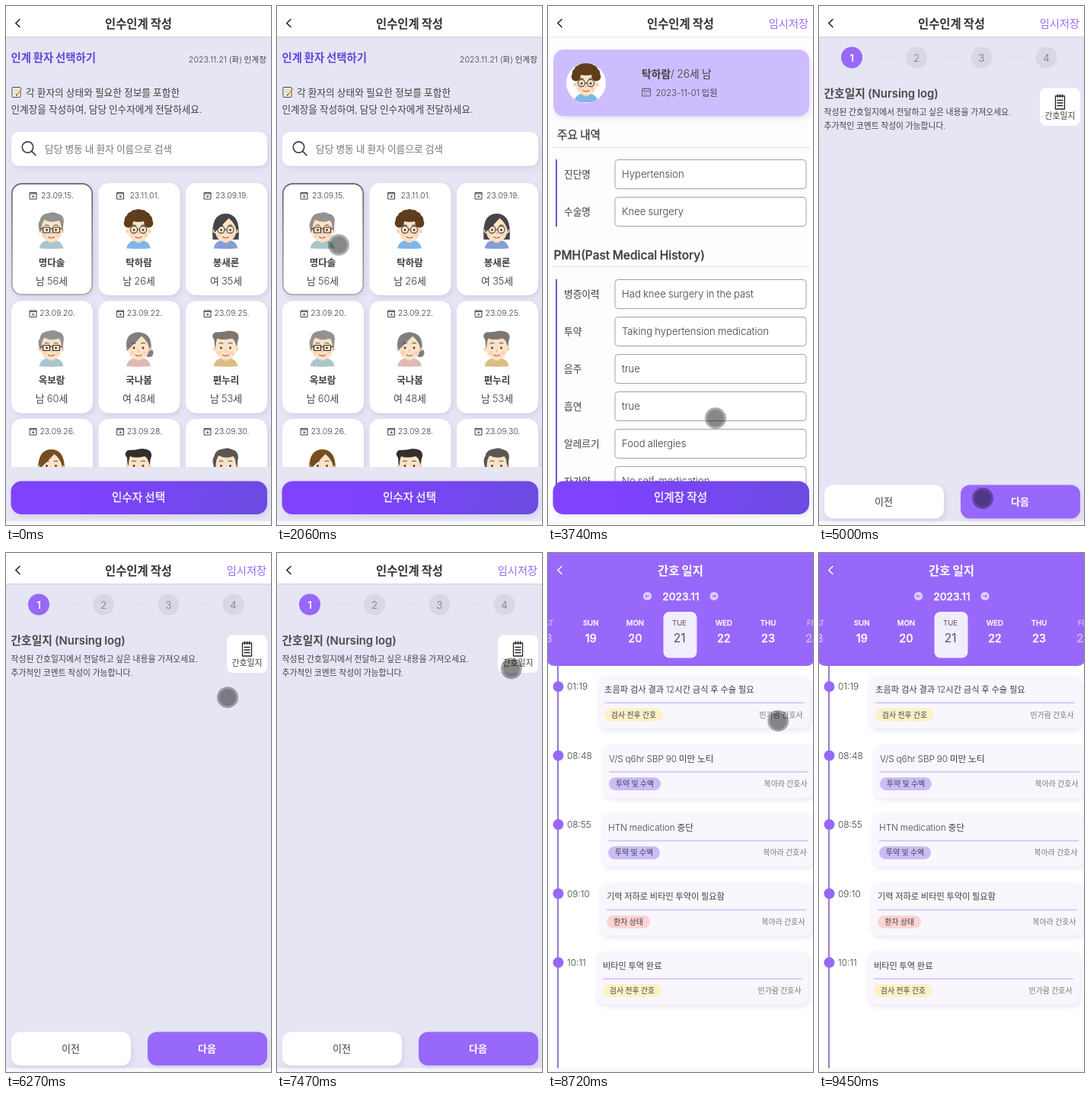
These frames come from a looping animation (348 px wide and 680 px high, 9790 ms). An HTML page:

```html
<!DOCTYPE html>
<html lang="ko">
<head>
<meta charset="utf-8">
<title>인수인계 작성</title>
<style>
html,body{margin:0;width:100%;height:100%;overflow:hidden;background:#fff}
svg{display:block;width:100vw;height:100vh}
text{font-family:Inter,"Noto Sans CJK KR","Noto Sans KR","Noto Sans CJK",sans-serif;word-spacing:-.04em}
.soft{filter:drop-shadow(2px 3px 3px rgba(80,60,160,.12))}
</style>
</head>
<body>
<svg id="stage" viewBox="0 0 348 680" preserveAspectRatio="none"></svg>
<script>
const LOOP = 9790, STEP = 200 / 3;
const PURPLE = '#9768fa', INK = '#404040', LILAC = '#e6e5f4';

// ---------- drawing helpers ----------
// Weight 500 gets a hairline outline, since the Korean face has no medium cut.
const text = (x, midY, str, size, {fill = INK, weight = 300, anchor = 'start', more = ''} = {}) =>
  `<text x="${x}" y="${midY + size * .37}" font-size="${size}" fill="${fill}" font-weight="${weight}" text-anchor="${anchor}"
    ${weight === 500 ? `stroke="${fill}" stroke-width=".3"` : ''} ${more}>${str}</text>`;
const rect = (x, y, w, h, r, fill, more = '') =>
  `<rect x="${x}" y="${y}" width="${w}" height="${h}" rx="${r}" fill="${fill}" ${more}/>`;
const circle = (x, y, r, fill, more = '') =>
  `<circle cx="${x}" cy="${y}" r="${r}" fill="${fill}" ${more}/>`;
const path = (d, fill, more = '') => `<path d="${d}" fill="${fill}" ${more}/>`;
const stroke = (d, color, width = 1, more = '') =>
  path(d, 'none', `stroke="${color}" stroke-width="${width}" stroke-linecap="round" stroke-linejoin="round" ${more}`);
const group = (body, attrs = '') => `<g ${attrs}>${body}</g>`;
const mid = (opts = {}) => ({anchor: 'middle', ...opts});

const backArrow = color => stroke('M18 17.5L12.8 22.5L18 27.5', color, 1.6);

function header(saveLink) {
  return rect(0, 0, 348, 40, 0, '#fff', 'style="filter:drop-shadow(0 1px 1px rgba(60,50,120,.12))"') +
    backArrow('#222') +
    text(174, 23, '인수인계 작성', 15.4, mid({weight: 700, fill: '#333'})) +
    (saveLink ? text(342, 23, '임시저장', 14.2, {fill: PURPLE, anchor: 'end'}) : '');
}

const mainButton = label =>
  rect(6.5, 622.5, 336.5, 43.5, 14, 'url(#cta)', 'class="soft"') +
  text(174, 644, label, 14.5, mid({fill: '#fff', weight: 500}));

// ---------- avatars ----------
const CAP = 'M-15 3Q-19-8-15-12Q-14-21-2-22Q3-24 8-21Q18-19 16-8L15 3L13-3Q13-9 10-12Q0-8-9-13Q-13-9-13 2Z';
const QUIFF = 'M-14 0Q-15-6-15-10Q-20-16-14-20Q-4-20 4-22Q18-22 17-12Q15-8 15 0L13-5Q12-10 8-12Q-4-9-11-12Q-13-8-13-1Z';
const FRINGE = 'M-15 4Q-17-19 0-20Q17-19 15 4Q13-8 4-15Q-5-5-15 4Z';

function curls(color) {
  let out = `<ellipse cy="-17" rx="14" ry="7" fill="${color}"/>`;
  for (let i = 0; i < 9; i++) {
    const a = Math.PI * (1 + i / 8);
    out += circle(13.3 * Math.cos(a), -8.5 + 12.5 * Math.sin(a), 6, color);
  }
  return out;
}

const hairstyles = {
  cap: c => ['', path(CAP, c)],
  quiff: c => ['', path(QUIFF, c)],
  curly: c => ['', curls(c)],
  bob: c => [path('M-17 13Q-20-21 0-21Q20-21 17 13Z', c), path(FRINGE, c)],
  bun: c => [circle(14, 7, 5.5, c) + path('M-15 4Q-20-19 0-20Q20-19 16 6Z', c), path(FRINGE, c)],
};

function avatar(x, y, {style, hair, shirt, glasses}) {
  const [back, front] = hairstyles[style](hair);
  const dark = '#4a3a35';
  const lens = side => circle(6 * side, 0, 4.6, 'none', 'stroke="#444" stroke-width="1.1"');
  const frames = {
    square: stroke('M-11-3h9v7h-9zM2-3h9v7h-9zM-2-1h4M-11-1h-3M11-1h3', '#333', 1.2),
    round: lens(-1) + lens(1) + stroke('M-1.5 0h3', '#444'),
  };
  return group(
    back + path('M-16 24.5Q-14 15-5 14H5Q14 15 16 24.5Q0 26-16 24.5Z', shirt) +
    path('M-5 10H5V15Q0 20-5 15Z', '#f6d0ac') +
    circle(-14, 2, 2.8, '#f6d3b1') + circle(14, 2, 2.8, '#f6d3b1') +
    path('M-13.5-5Q-13.5-17 0-17Q13.5-17 13.5-5V3Q12.5 15 0 16Q-12.5 15-13.5 3Z', '#fde2c6') +
    circle(-8.5, 7, 2.6, '#f9c9b4', 'opacity=".6"') + circle(8.5, 7, 2.6, '#f9c9b4', 'opacity=".6"') +
    front +
    stroke('M-8.5-5.5q2.5-1.5 5 0M3.5-5.5q2.5-1.5 5 0', dark, 1) +
    circle(-6, .5, 1.4, dark) + circle(6, .5, 1.4, dark) +
    (frames[glasses] || '') +
    stroke('M0 3v2.5', '#e3b08c', 1.2) + stroke('M-4 9.5q4 3 8 0', '#b5604f', 1.1),
    `transform="translate(${x} ${y})"`);
}

const elder = {style: 'cap', hair: '#929292', shirt: '#a9c6cd', glasses: 'square'};
const curly = {style: 'curly', hair: '#5f3d1d', shirt: '#7fb6e8', glasses: 'round'};
const patients = [
  ['23.09.15.', '명다솔', '남 56세', elder],
  ['23.11.01.', '탁하람', '남 26세', curly],
  ['23.09.19.', '봉새론', '여 35세', {style: 'bob', hair: '#45454b', shirt: '#879cd8', glasses: 'round'}],
  ['23.09.20.', '옥보람', '남 60세', elder],
  ['23.09.22.', '국나봄', '여 48세', {style: 'bun', hair: '#7f7f7f', shirt: '#dfb9b9'}],
  ['23.09.25.', '편누리', '남 53세', {style: 'quiff', hair: '#7d756f', shirt: '#dcbc82'}],
  ['23.09.26.', '', '', {style: 'bob', hair: '#774d20', shirt: '#c99'}],
  ['23.09.28.', '', '', {style: 'quiff', hair: '#332f2e', shirt: '#89a'}],
  ['23.09.30.', '', '', {style: 'cap', hair: '#5c5654', shirt: '#9ab'}],
];

// ---------- pages ----------
function patientCard([date, name, age, face], i) {
  const x = 7 + 114.5 * (i % 3), y = 232 + 154.5 * Math.floor(i / 3), cx = x + 53.5;
  const border = i ? '' : rect(x + .8, y + .8, 105.4, 145.4, 13, 'none', 'stroke="url(#chosen)" stroke-width="1.7"');
  return rect(x, y, 107, 147, 14, '#fff', 'class="soft"') + border +
    stroke(`M${cx - 29} ${y + 12.5}h8.5v8.5h-8.5zM${cx - 29} ${y + 14}h8.5`, INK) +
    stroke(`M${cx - 26} ${y + 17.7}h2.6M${cx - 24.7} ${y + 16.5}v2.4`, INK, .9) +
    text(cx + 7, y + 16, date, 10.5, mid()) +
    avatar(cx - 1, y + 61, face) +
    text(cx - .5, y + 104, name, 12.5, mid({weight: 700})) +
    text(cx - .5, y + 128, age, 12.9, mid());
}

const selectPage = () =>
  rect(0, 0, 348, 675, 0, LILAC) + header(false) +
  text(6.5, 68, '인계 환자 선택하기', 14.4, {fill: '#6345d8', weight: 700}) +
  text(342, 70, '2023.11.21 (화) 인계장', 10.7, {anchor: 'end'}) +
  rect(8, 106.5, 11, 13, 1, '#fffdf5', 'stroke="#444"') +
  stroke('M10 110h6M10 113h5M10 116h3', '#999', .8) +
  stroke('M20.5 108.5L14.5 116', '#d9a441', 2) + stroke('M14.5 116l-.8 1.4', '#333', 1.2) +
  text(26, 113, '각 환자의 상태와 필요한 정보를 포함한', 12.7) +
  text(6.5, 135, '인계장을 작성하여, 담당 인수자에게 전달하세요.', 12.6) +
  rect(7, 165, 336, 44.5, 10, '#fff', 'class="soft"') +
  circle(28.5, 185, 7.2, 'none', 'stroke="#444" stroke-width="1.7"') + stroke('M33.8 190.3L38.8 195.3', '#444', 1.8) +
  text(51, 187, '담당 병동 내 환자 이름으로 검색', 12.7, {fill: '#777'}) +
  group(patients.map(patientCard).join(''), 'clip-path="url(#list)"') +
  mainButton('인수자 선택');

const field = (y, label, value) =>
  text(21, y + 19, label, 12.7) +
  rect(88, y + .5, 251, 38, 4, '#fff', 'stroke="#a3a3a3"') +
  text(97, y + 19.5, value, 13.1);

const chartPage = () => {
  const history = [['병증이력', 'Had knee surgery in the past'], ['투약', 'Taking hypertension medication'],
    ['음주', 'true'], ['흡연', 'true'], ['알레르기', 'Food allergies'], ['자가약', 'No self-medication']];
  return rect(0, 0, 348, 675, 0, '#fdfdfe') + header(true) +
    rect(7, 57, 336, 87.5, 14, '#cdbdff', 'class="soft"') +
    circle(50, 101, 26, '#fff') +
    group(avatar(50, 101, curly), 'clip-path="url(#portrait)"') +
    text(123, 89, `<tspan font-weight="700">탁하람</tspan>/ 26세 남`, 13.8) +
    stroke('M124 108.5h10.5v9.5h-10.5zM124 111.5h10.5M126.5 107v2M132 107v2', '#555', .9) +
    stroke('M126.5 114h.1M129.2 114h.1M132 114h.1M126.5 116h.1M129.2 116h.1', '#555', 1) +
    text(141.5, 113.5, '2023-11-01 입원', 11.2) +
    text(12, 169, '주요 내역', 14.6, {weight: 500}) +
    rect(7, 185, 336, 1, 0, '#ddd') + rect(10, 201, 2, 88, 0, '#7250d8') +
    field(201, '진단명', 'Hypertension') + field(250, '수술명', 'Knee surgery') +
    text(7.5, 326, 'PMH(Past Medical History)', 15.5, {weight: 500}) +
    rect(7, 341, 336, 1, 0, '#ddd') + rect(10, 358, 2, 280, 0, '#7250d8') +
    history.map(([label, value], i) => field(358 + 49 * i, label, value)).join('') +
    mainButton('인계장 작성');
};

const stepPage = () =>
  rect(0, 0, 348, 675, 0, LILAC) + header(true) +
  [1, 2, 3, 4].map((n, i) => {
    const x = 43 + 85.2 * i;
    return circle(x, 67.5, 14, i ? '#d9d6e6' : PURPLE) +
      text(x, 68, n, 13.5, mid(i ? {fill: '#777'} : {fill: '#fff', weight: 600})) +
      (i < 3 ? rect(x + 37, 67, 21, 1, 0, '#dad8e8') : '');
  }).join('') +
  text(6.5, 114.5, '간호일지 (Nursing log)', 14.8, {weight: 600, fill: '#4a4a4a'}) +
  text(6.5, 139, '작성된 간호일지에서 전달하고 싶은 내용을 가져오세요.', 10.85) +
  text(6.5, 157, '추가적인 코멘트 작성이 가능합니다.', 10.8) +
  rect(290, 107.5, 53, 49.5, 8, '#fff') +
  stroke('M310.5 118h12v17h-12zM313.5 116v3.5M316.5 116v3.5M319.5 116v3.5M313 123.5h7M313 127h7M313 130.5h7', '#222', 1.3) +
  text(316.5, 144, '간호일지', 10.9, mid()) +
  rect(7, 627.5, 157, 44, 12, '#fff', 'class="soft"') + text(85, 649, '이전', 13, mid()) +
  rect(186, 627.5, 157, 44, 12, PURPLE, 'class="soft"') + text(264, 649, '다음', 13, mid({fill: '#fff', weight: 700}));

const arrowDot = (x, dir) =>
  circle(x, 56.5, 5.6, '#dccdff') +
  stroke(`M${x - 2.4} 56.5h4.8M${x + dir * .6} 54.7l${dir * 1.8} 1.8l${-dir * 1.8} 1.8`, PURPLE, 1);

const calendarPage = () =>
  rect(0, 0, 348, 675, 0, '#fff') + rect(-2, -20, 352, 168, 10, PURPLE) +
  backArrow('#fff') +
  text(174, 23.5, '간호 일지', 15.5, mid({fill: '#fff', weight: 700})) +
  arrowDot(130.5, -1) + arrowDot(218, 1) +
  text(174.5, 56.5, '2023.11', 13.7, mid({fill: '#fff', weight: 500})) +
  rect(151.5, 77, 44, 60.5, 8, '#f1edfd') +
  ['SAT', 'SUN', 'MON', 'TUE', 'WED', 'THU', 'FRI'].map((day, i) => {
    const x = -2 + 58.2 * i, today = i === 3;
    const opts = mid({fill: today ? '#555060' : '#fff', weight: today ? 400 : 500,
      more: i % 6 ? '' : 'opacity=".5"'});
    return text(x, 91.5, day, 9.6, opts) + text(x, 111.5, 18 + i, today ? 15.4 : 14.4, opts);
  }).join('');

const loader = () =>
  path('M149 384.5Q146 384 147 388L153 440.5L197 436.5L190.5 381Q190 378.5 187 379Z', '#9145fb') +
  stroke('M148 387.5L191 383M151 393.5l37-4M152 403l37-4M153 412.5l36-4M154 422l26-3', '#7b35e8', 1.1) +
  path('M202.5 388L208.5 391L189 425L181.5 431.5L183 422Z', '#a873fb') +
  stroke('M201 391l6 3.2', '#8a4df0', 1);

const chips = {
  check: ['검사 전후 간호', 77, '#fdf1c6'],
  drug: ['투약 및 수액', 68, '#c9bcf7'],
  state: ['환자 상태', 57, '#fbd4d3'],
};
const entries = [
  [65, '01:19', '초음파 검사 결과 12시간 금식 후 수술 필요', 11.3, 'check', '빈가람'],
  [71, '08:48', 'V/S q6hr SBP 90 미만 노티', 11.7, 'drug', '복아라'],
  [70, '08:55', 'HTN medication 중단', 11.7, 'drug', '복아라'],
  [68, '09:10', '기력 저하로 비타민 투약이 필요함', 11.2, 'state', '복아라'],
  [63, '10:11', '비타민 투역 완료', 11.2, 'check', '빈가람'],
];

const timeline = () => rect(12.2, 148, 1.6, 527, 0, '#7a5cc4') +
  entries.map(([x, time, note, size, kind, nurse], i) => {
    const y = 160.5 + 90.4 * i, [label, width, tint] = chips[kind];
    return circle(13.5, y + 14.5, 7, PURPLE) + text(25, y + 14.5, time, 11.9) +
      rect(x, y, 279, 69.5, 10, '#f9f6fe', 'class="soft"') +
      text(x + 9, y + 18.5, note, size) +
      rect(x + 9, y + 35, 262, 1.6, 0, '#d0c3f6') +
      rect(x + 9, y + 43, width, 17, 8.5, tint) +
      text(x + 9 + width / 2, y + 51.5, label, 9.9, mid()) +
      text(x + 269.5, y + 51.5, nurse + ' 간호사', 9.9, {anchor: 'end', fill: '#777'});
  }).join('');

// ---------- assembly ----------
const stage = document.getElementById('stage');
stage.innerHTML = `<defs>
  <linearGradient id="cta"><stop offset=".25" stop-color="#7f42ff"/><stop offset="1" stop-color="#6b4be0"/></linearGradient>
  <linearGradient id="chosen" x2="0" y2="1"><stop stop-color="#666"/><stop offset="1" stop-color="#aaa"/></linearGradient>
  <clipPath id="list"><rect y="225" width="348" height="379"/></clipPath>
  <clipPath id="portrait"><circle cx="50" cy="101" r="26"/></clipPath>
</defs>` + rect(0, 0, 348, 680, 0, '#f8f8fa') +
  group(selectPage(), 'id="select"') + group(chartPage(), 'id="chart"') +
  group(stepPage(), 'id="steps"') + group(calendarPage(), 'id="calendar"') +
  group(loader(), 'id="loader"') + group(timeline(), 'id="timeline"') +
  group(circle(0, 0, 14, '#000', 'opacity=".33"') + circle(0, 0, 11, '#000', 'opacity=".2"'), 'id="pointer"');

// When each layer is on screen.
const spans = {
  select: [0, 2900], chart: [2900, 4870], steps: [4870, 7790],
  calendar: [7790, LOOP], loader: [7790, 8520], timeline: [8520, LOOP], pointer: [460, 9450],
};
const layers = Object.entries(spans).map(([id, span]) => [document.getElementById(id), ...span]);
const pointer = document.getElementById('pointer');

// Pointer route: time, x, y.
const route = [
  [460, 324, 286], [933, 73, 313], [2000, 73, 313], [2067, 81, 313], [2267, 140, 311], [2467, 140, 311],
  [2700, 176, 318], [2867, 176, 318], [3467, 285, 101], [3733, 220, 540], [4133, 215, 645],
  [5067, 215, 645], [5400, 215, 623], [5533, 215, 623], [6267, 291, 189], [6533, 305, 136],
  [6733, 305, 136], [7133, 332, 535], [7533, 303, 75], [7733, 316, 140], [8067, 314, 174],
  [8733, 301, 225], [9450, 26, 690],
];

function pointerAt(t) {
  const next = route.findIndex(key => key[0] > t);
  if (next < 1) return (next ? route[route.length - 1] : route[0]).slice(1);
  const [t0, x0, y0] = route[next - 1], [t1, x1, y1] = route[next];
  const k = (t - t0) / (t1 - t0);
  return [x0 + (x1 - x0) * k, y0 + (y1 - y0) * k];
}

function render(t) {
  for (const [node, from, to] of layers) node.style.display = t >= from && t < to ? '' : 'none';
  const ticked = Math.floor((t + 12) / STEP) * STEP;
  const [x, y] = pointerAt(ticked);
  const pressed = t >= 4730 && t < 4870;
  pointer.setAttribute('transform', `translate(${x} ${y}) scale(${pressed ? 1.07 : 1})`);
}

const start = performance.now();
function frame() {
  render((performance.now() - start) % LOOP);
  requestAnimationFrame(frame);
}
frame();
</script>
</body>
</html>
```
